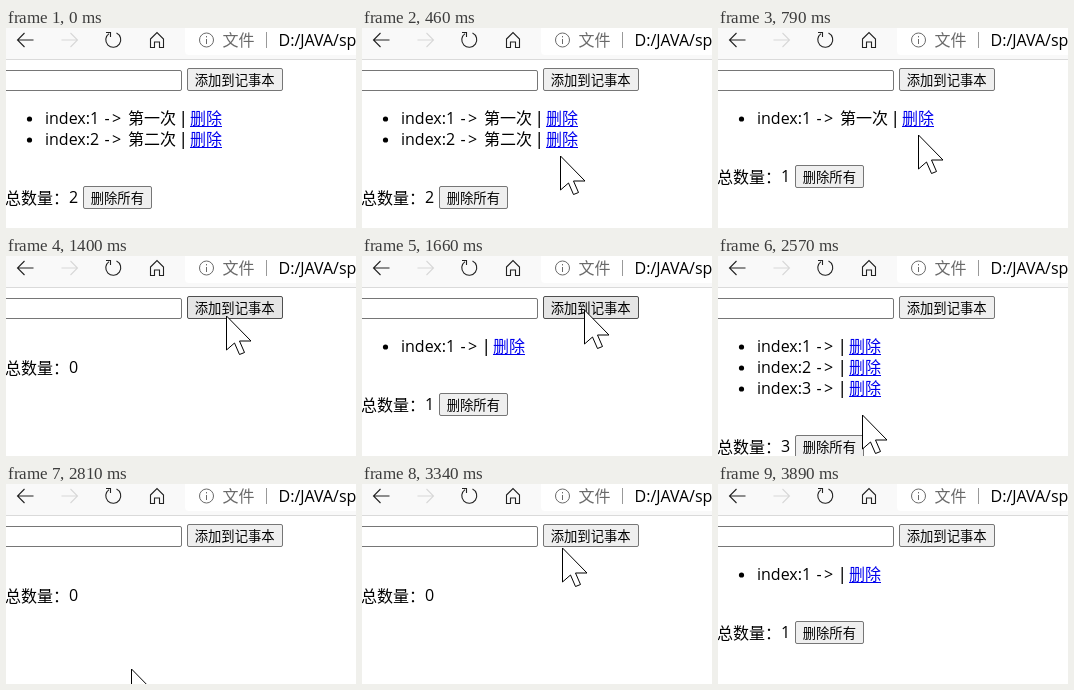
These frames come from a looping animation (350 by 200 pixels, 4.45 s). An HTML page with a canvas:

```html
<!DOCTYPE html>
<html lang="zh">
<head>
<meta charset="utf-8">
<style>
html, body { margin: 0; width: 100%; height: 100%; overflow: hidden; background: #fff; }
canvas { display: block; }
</style>
</head>
<body>
<canvas width="350" height="200"></canvas>
<script>
const ctx = document.querySelector('canvas').getContext('2d');
const LOOP = 4450;
const STEP = 75; // the screen refreshes, and a click lasts, this long
const CLEARED = 1250;
const FONT = '"Open Sans", "Noto Sans CJK SC", "Noto Sans CJK", sans-serif';

// Releases of the mouse button: [time, notes added]
const clicks = [[700, -1], [CLEARED, -1], [1660, 1], [2035, 1], [2110, 1], [2810, -3], [3490, 1]];

// Pointer path: [time, x, y]
const path = [
  [75, 188, 215], [525, 200, 111], [675, 200, 111], [750, 200, 107], [900, 200, 97],
  [1200, 200, 97], [1350, 220, 60], [1500, 222, 54], [2250, 222, 54], [2625, 125, 185],
  [2850, 125, 185], [3075, 159, 68], [3300, 200, 64], [3375, 200, 62], [3675, 200, 62],
  [3825, 210, 215]
];

function pointerAt(time) {
  const t = Math.floor(time / STEP) * STEP;
  const i = path.findIndex(p => p[0] > t);
  const [t1, x1, y1] = path.at(i);
  const [t0, x0, y0] = i > 0 ? path[i - 1] : [t1 - 1, x1, y1];
  const k = Math.min(1, (t - t0) / (t1 - t0));
  return [x0 + (x1 - x0) * k, y0 + (y1 - y0) * k].map(Math.round);
}

function text(str, x, y, color = '#000', size = 16) {
  ctx.font = `${size}px ${FONT}`;
  ctx.fillStyle = color;
  ctx.fillText(str, x, y);
}

function line(d, color, width = 1.1) {
  ctx.strokeStyle = color;
  ctx.lineWidth = width;
  ctx.stroke(new Path2D(d));
}

function rect(x, y, w, h, color) {
  ctx.fillStyle = color;
  ctx.fillRect(x, y, w, h);
}

function box(x, y, w, h, fill, stroke) {
  ctx.beginPath();
  ctx.roundRect(x + .5, y + .5, w - 1, h - 1, 1.5);
  ctx.fillStyle = fill;
  ctx.fill();
  ctx.strokeStyle = stroke;
  ctx.lineWidth = 1;
  ctx.stroke();
}

function disc(x, y, r, color) {
  ctx.beginPath();
  ctx.arc(x, y, r, 0, 7);
  ctx.fillStyle = color;
  ctx.fill();
}

function button(label, x, y, w, [px, py]) {
  const hot = px >= x && px < x + w && py >= y && py <= y + 23;
  box(x, y, w, 23, hot ? '#e5e5e5' : '#efefef', hot ? '#4f4f4f' : '#767676');
  text(label, x + 7.7, y + 17, '#000', 13.333);
}

function arrowIcon(x, color) {
  line(`M${x + 16} 12H${x}M${x + 7} 5L${x} 12L${x + 7} 19`, color);
}

function toolbar() {
  rect(0, 0, 350, 31, '#f9f9f9');
  rect(0, 31, 350, 1, '#dadada');
  ctx.fillStyle = '#fff';
  ctx.beginPath();
  ctx.roundRect(179, -8, 190, 35, 4);
  ctx.fill();

  arrowIcon(11.5, '#222');
  ctx.save();
  ctx.translate(126, 0);
  ctx.scale(-1, 1);
  arrowIcon(54.5, '#d8d8d8');
  ctx.restore();
  line('M110.5 5A7.5 7.5 0 1 1 103 5.6M100 4.5H104.5V9', '#222');
  line('M144.5 11L151 4.5L157.5 11V19.5H153.5V14H148.5V19.5H144.5Z', '#222');
  line('M193.5 12a7 7 0 1 0 14 0a7 7 0 1 0 -14 0M200.5 11V16M200.5 8V9.4', '#6a6a6a', 1);
  text('文件', 216.5, 18, '#6a6a6a');
  rect(260, 4, 1, 16, '#999');
  text('D:/JAVA/sp', 272.5, 18);
}

function note(i, named) {
  const y = 96 + 21 * i;
  const x = named ? 175 : 122;
  disc(23.5, y - 5, 2.6, '#000');
  text('index:' + (i + 1), 39, y);
  text('-', 98.5, y);
  text('>', 106, y);
  if (named) text('第' + '一二'[i] + '次', 122, y);
  rect(x + 1.5, y - 13, 1.5, 17, '#222');
  text('删除', x + 9, y, '#0000ee');
  rect(x + 9, y + 2, 32, 1, '#0000ee');
}

function pointer(x, y, pressed) {
  if (pressed) disc(x, y, 26, 'rgba(255,255,0,.47)');
  ctx.save();
  ctx.translate(x + .5, y);
  const arrow = new Path2D('M0 0V34L8 27L13 38.5L18 36.5L13 25H24.5Z');
  ctx.fillStyle = '#fff';
  ctx.fill(arrow);
  line(arrow, '#000', 1);
  ctx.restore();
}

function draw(t) {
  const n = clicks.reduce((sum, [at, add]) => at <= t ? sum + add : sum, 2);
  const pressed = clicks.some(([at]) => t >= at - STEP && t < at);
  const tip = pointerAt(t);
  rect(0, 0, 350, 200, '#fff');
  toolbar();
  box(-5, 42, 181, 21, '#fff', '#767676');
  button('添加到记事本', 181, 40, 96, tip);
  for (let i = 0; i < n; i++) note(i, t < CLEARED);
  const y = n ? 133 + 21 * n : 117;
  text('总数量：', -1, y + 1);
  text(n, 63, y);
  if (n) button('删除所有', 77, 116 + 21 * n, 69, tip);
  pointer(...tip, pressed);
}

const begin = performance.now();
function frame() {
  draw((performance.now() - begin) % LOOP);
  requestAnimationFrame(frame);
}
frame();
</script>
</body>
</html>
```
